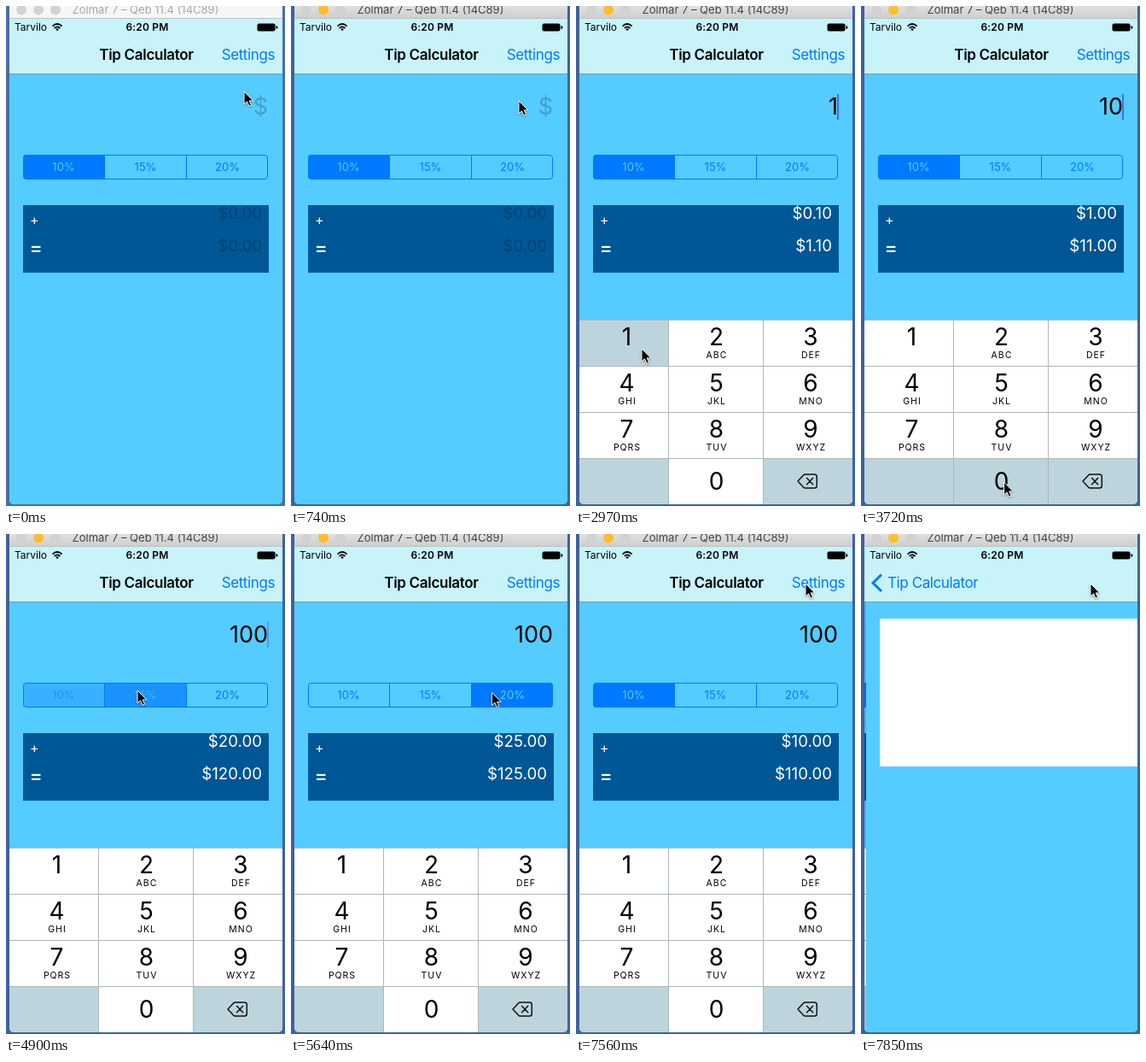
An HTML page that plays this animation: 327 px wide and 585 px high, repeating every 8000 ms.

```html
<!DOCTYPE html>
<html lang="en">
<head>
<meta charset="utf-8">
<title>Tip Calculator</title>
<style>
  html, body { margin: 0; width: 100%; height: 100%; overflow: hidden; background: #42659f; }
  svg { display: block; width: 100vw; height: 100vh; font-family: Inter, Roboto, "Liberation Sans", sans-serif; }
  .mid { text-anchor: middle; }
  .end { text-anchor: end; }
  .link { fill: #007aff; font-size: 17px; letter-spacing: -.4px; }
  .seg { font-size: 13px; }
  .bill { font-size: 27px; }
  .amount { font-size: 18.7px; }
  .digit { font-size: 28px; }
  .letters { font-size: 10.5px; letter-spacing: 1px; }
</style>
</head>
<body>
<svg viewBox="0 0 327 585" preserveAspectRatio="none">
  <defs>
    <clipPath id="window"><path d="M4 0H324V578a5 5 0 0 1-5 5H9a5 5 0 0 1-5-5Z"/></clipPath>
    <clipPath id="segments"><rect x="20" y="174" width="287" height="29" rx="4"/></clipPath>
    <linearGradient id="bar" x2="0" y2="1">
      <stop stop-color="#e0dfe0"/><stop offset="1" stop-color="#d0cfd0"/>
    </linearGradient>
  </defs>
  <rect id="desktop" width="327" height="585"/>
  <g clip-path="url(#window)">
    <rect x="4" y="14" width="320" height="569" fill="#55ccff"/>

    <g id="main">
      <rect x="4" y="79" width="320" height="504" fill="#55ccff"/>
      <text id="bill" class="bill end" x="307" y="127"></text>
      <rect id="caret" x="306" y="103" width="2" height="30" fill="#426bf2"/>
      <g id="seg" clip-path="url(#segments)"></g>
      <path d="M115.5 175V202M211.5 175V202" stroke="#007aff"/>
      <rect x="20.5" y="174.5" width="286" height="28" rx="3.5" fill="none" stroke="#007aff"/>
      <rect x="20" y="233" width="288" height="79" fill="#005795"/>
      <text x="28" y="255.5" font-size="16" fill="#fff">+</text>
      <text x="27.5" y="291" font-size="23" font-weight="500" fill="#fff">=</text>
      <text id="tip" class="amount end" x="300" y="249"></text>
      <text id="total" class="amount end" x="300" y="287"></text>
      <g id="keyboard">
        <g id="keys"></g>
        <path d="M4 367.5H324M4 421.5H324M4 475.5H324M4 529.5H324M108.5 367V583M219.5 367V583" stroke="#aeb6ba"/>
        <path d="M260 556L266.5 549Q267.3 548 268.6 548H279.5Q282.3 548 282.3 550.8V561.2Q282.3 564 279.5 564H268.6Q267.3 564 266.5 563ZM270.5 552.2L277.7 559.8M277.7 552.2L270.5 559.8"
              fill="none" stroke="#111" stroke-width="1.5" stroke-linejoin="round" stroke-linecap="round"/>
      </g>
      <rect id="dim" x="4" y="79" width="320" height="504" opacity="0"/>
    </g>

    <g id="next">
      <rect x="6" y="79" width="320" height="504" fill="#55ccff"/>
      <rect x="22" y="99" width="304" height="173" fill="#fff"/>
    </g>

    <rect x="4" y="14" width="320" height="65" fill="#c7f3f9"/>
    <rect x="4" y="79" width="320" height="1" fill="#72a3b2"/>
    <text x="10" y="29" font-size="12">Tarvilo</text>
    <g fill="none" stroke="#000" stroke-width="1.7">
      <path d="M54.6 23.6Q60 18.4 65.6 23.6M56.7 26Q60 22.8 63.5 26"/>
      <path d="M58.2 27.1Q60 25.6 62 27.1L60.1 29.2Z" fill="#000" stroke="none"/>
    </g>
    <text class="mid" x="165.5" y="29" font-size="12" font-weight="600" letter-spacing=".2">6:20 PM</text>
    <rect x="294.5" y="20.5" width="21" height="9" rx="2" fill="#000"/>
    <path d="M316.5 23V27Q318.5 26.5 318.5 25T316.5 23" fill="#000"/>
    <g id="navMain">
      <text class="mid" x="164.5" y="63" font-size="17" font-weight="600" letter-spacing="-.3">Tip Calculator</text>
      <text id="settings" class="link end" x="315" y="63">Settings</text>
    </g>
    <g id="navNext">
      <path d="M24 47.5L14 57.2L24 67" fill="none" stroke="#007aff" stroke-width="3"/>
      <text class="link" x="31" y="63">Tip Calculator</text>
    </g>

    <rect id="titleBar" x="4" width="320" height="14"/>
    <rect x="4" y="14" width="320" height="1" fill="#b9c4c6"/>
    <g fill="#d2d2d2">
      <circle cx="18" cy="4.5" r="6"/>
      <circle id="minimise" cx="38" cy="4.5" r="6"/>
      <circle cx="58" cy="4.5" r="6"/>
    </g>
    <text id="title" class="mid" x="163.5" y="9" font-size="13">Zolmar 7 – Qeb 11.4 (14C89)</text>
  </g>
  <path id="pointer" d="M0 0V15L3.5 11.8L6 17.2L8.5 16.1L6.2 10.9H10.8Z" stroke="#fff" stroke-width="1"
        style="filter:drop-shadow(0 1px 1px rgba(0,0,0,.35))"/>
</svg>
<script>
const LOOP = 8000, START = 300, STEP = 148.04;
const $ = id => document.getElementById(id);
const set = (el, attrs) => { for (const k in attrs) el.setAttribute(k, attrs[k]); };

function add(parent, tag, attrs, text = '') {
  const el = document.createElementNS('http://www.w3.org/2000/svg', tag);
  set(el, attrs);
  el.textContent = text;
  return parent.appendChild(el);
}

// Segmented control
const segments = ['10%', '15%', '20%'].map((label, i) => ({
  fill: add($('seg'), 'rect', { x: 20 + 96 * i - (i ? 0.5 : 0), y: 174, width: 96, height: 29, fill: '#007aff' }),
  text: add($('seg'), 'text', { class: 'seg mid', x: 67.5 + 96 * i, y: 193 }, label)
}));

// Number pad
const columns = [[4, 105, 59.5], [109, 111, 164.5], [220, 104, 275]];
const letters = ['', 'ABC', 'DEF', 'GHI', 'JKL', 'MNO', 'PQRS', 'TUV', 'WXYZ'];
const keys = {};
for (let i = 0; i < 12; i++) {
  const [x, width, mid] = columns[i % 3], y = 367 + 54 * Math.floor(i / 3);
  const label = i < 9 ? String(i + 1) : i === 10 ? '0' : '';
  const key = add($('keys'), 'rect', { x, y, width, height: 54, fill: label ? '#fff' : '#bdd4dc' });
  if (!label) continue;
  keys[label] = key;
  add($('keys'), 'text', { class: 'digit mid', x: mid, y: y + (i < 9 ? 30 : 37) }, label);
  if (letters[i]) add($('keys'), 'text', { class: 'letters mid', x: mid + 0.5, y: y + 45 }, letters[i]);
}

// Timed events: [time, value...]
const bills = [[0, ''], [2950, '1'], [3690, '10'], [3840, '100']];
const presses = [[0, ''], [2950, '1'], [3100, ''], [3690, '0'], [3840, '']];
const choices = [[0, 0], [4880, 1], [5470, 2], [6060, 1], [6650, 0]];
const rates = [0.1, 0.2, 0.25];
const path = [
  [0, 279, 100], [739, 279, 100], [740, 267, 111], [1640, 267, 111], [2370, 80, 397],
  [2510, 75, 406], [2660, 77, 401], [2970, 77, 401], [3400, 167.5, 557], [4005, 167.5, 557],
  [4590, 154, 183], [4890, 154, 183], [5340, 254, 185], [5490, 257, 186], [5930, 166, 184],
  [6080, 162, 185], [6515, 72, 185.5], [6670, 70, 186], [7110, 270, 60], [7250, 269, 58], [LOOP, 269, 58]
];

const lastIndex = (list, t) => list.reduce((found, e, i) => e[0] <= t ? i : found, 0);
const valueAt = (list, t) => list[lastIndex(list, t)][1];
const money = v => '$' + v.toFixed(2);

function pointerAt(t) {
  const i = Math.min(lastIndex(path, t), path.length - 2);
  const [t0, x0, y0] = path[i], [t1, x1, y1] = path[i + 1];
  const p = (t - t0) / (t1 - t0), e = p * p * (3 - 2 * p);
  return [x0 + (x1 - x0) * e, y0 + (y1 - y0) * e];
}

function caretAt(t) {
  if (t < 1330 || (t > 2150 && t < 2600)) return 0;
  if (t < 4450) return 1;
  const phase = (t - 450) % 1000;
  return phase < 420 ? 0 : phase < 500 ? 0.5 : 1;
}

function drawSegments(t) {
  const i = lastIndex(choices, t), [since, now] = choices[i];
  const before = i ? choices[i - 1][1] : now;
  const fade = i ? Math.min(1, (t - since + 80) / 130) : 1;
  segments.forEach(({ fill, text }, k) => {
    const a = k === now ? fade : k === before ? 1 - fade : 0;
    set(fill, { opacity: a });
    set(text, { fill: `rgb(${85 * a},${122 + 82 * a},255)` });
  });
  return rates[now];
}

function draw(time) {
  const n = Math.floor((time - START) / STEP + 0.05);
  const t = n < 0 ? 0 : START + n * STEP;

  const active = t >= START;
  set($('desktop'), { fill: active ? '#3f629f' : '#4a6ea9' });
  set($('titleBar'), { fill: active ? 'url(#bar)' : '#f6f6f6' });
  set($('minimise'), { fill: active ? '#ffbd2e' : '#d2d2d2' });
  set($('title'), { fill: active ? '#454545' : '#a9a9a9' });

  const rate = drawSegments(t);
  const bill = valueAt(bills, t), amount = Number(bill);
  $('bill').textContent = bill || '$';
  set($('bill'), { fill: bill ? '#000' : '#43a1cb' });
  $('tip').textContent = money(amount * rate);
  $('total').textContent = money(amount * (1 + rate));
  for (const id of ['tip', 'total']) set($(id), { fill: bill ? '#fff' : '#004375' });
  set($('caret'), { opacity: caretAt(t) });

  const rise = Math.min(1, Math.max(0, (t - 1270) / 407));
  set($('keyboard'), { transform: `translate(0 ${216 * (1 - rise) ** 3})` });
  const pressed = valueAt(presses, t);
  for (const k in keys) set(keys[k], { fill: k === pressed ? '#bdd4dc' : '#fff' });

  const pushed = t > 7840;
  set($('main'), { transform: `translate(${pushed ? -96 : 0} 0)` });
  set($('dim'), { opacity: pushed ? 0.12 : 0 });
  for (const id of ['next', 'navNext']) set($(id), { visibility: pushed ? 'visible' : 'hidden' });
  set($('navMain'), { visibility: pushed ? 'hidden' : 'visible' });
  set($('settings'), { opacity: t < 7250 || t > 7540 ? 1 : t < 7400 ? 0.25 : 0.55 });

  set($('pointer'), { transform: `translate(${pointerAt(t)})` });
}

function tick() {
  draw(performance.now() % LOOP);
  requestAnimationFrame(tick);
}
tick();
</script>
</body>
</html>
```
